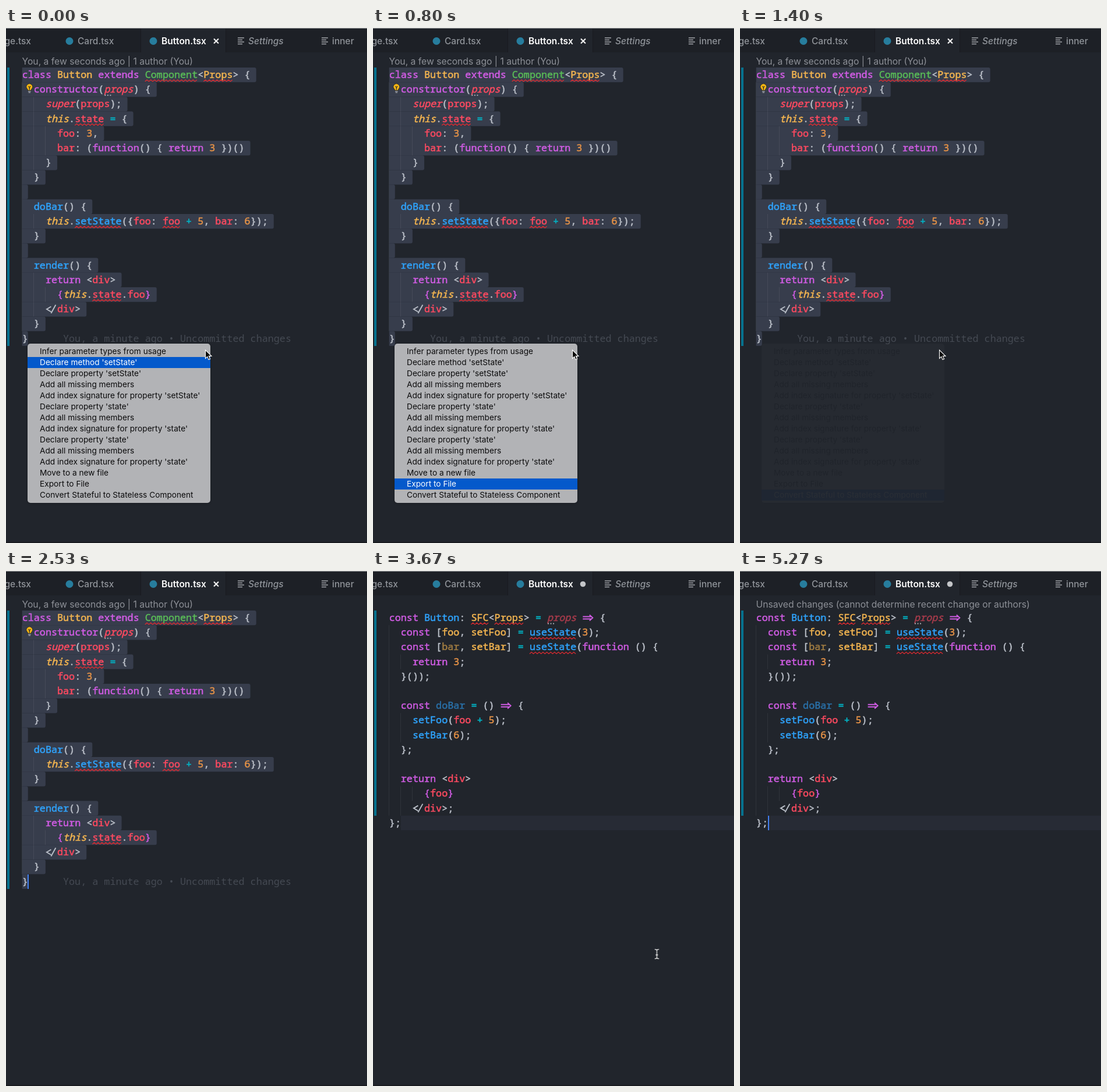
Recreate the animation shown at these times as an HTML page. Size 620 by 886 pixels, loop 5.34 s.

```html
<!DOCTYPE html>
<html lang="en">
<head>
<meta charset="utf-8">
<title>Editor refactoring</title>
<style>
  html, body { margin: 0; width: 620px; height: 886px; overflow: hidden; background: #21252c; }
  body { position: relative; }
  svg { position: absolute; left: 0; top: 0; display: block; }
  text { white-space: pre; }

  .ui { font: 500 15.5px Inter, Roboto, sans-serif; fill: #90949a; }
  .ui .open { font-weight: 600; fill: #fff; }
  .lens { font: 15.7px Inter, Roboto, sans-serif; fill: #8d9097; }
  .code { font: 500 16.75px "Noto Sans Mono", "DejaVu Sans Mono", monospace; stroke-width: .55; }
  .blame { fill: #454a53; font-weight: 400; }
  .guide { stroke: #fff; stroke-opacity: .07; stroke-width: 1; }
  .wave { fill: none; stroke: #dc2a30; stroke-width: 1.3; }
  .liga { fill: none; stroke-width: 1.9; }

  .menu {
    position: absolute; left: 37px; top: 543px; width: 314px; height: 267px; padding: 4px 0 3px;
    border-radius: 5px; background: #b2b3b6; box-shadow: 0 1px 4px rgba(0, 0, 0, .2);
    font: 13.7px/19px Inter, Roboto, sans-serif; color: #0b0b0c;
  }
  .list div { height: 19px; padding-left: 21px; white-space: pre; }
  .pick { position: absolute; left: 0; top: 23px; width: 314px; height: 19px; overflow: hidden; background: #0459cb; color: #fff; }
  .pick .list { margin-top: -19px; }

  .before, .after, .menu, .pick, .pick .list, .lens2, .caret1, .caret2, .arrow, .beam {
    animation: 5340ms step-end infinite;
  }
  .before { animation-name: before; }
  .after { animation-name: after; }
  .menu { animation-name: menu; animation-timing-function: linear; }
  .pick { animation-name: down; }
  .pick .list { animation-name: up; }
  .lens2 { animation-name: lens; }
  .caret1 { animation-name: blink1; }
  .caret2 { animation-name: blink2; }
  .arrow { animation-name: arrow; }
  .beam { animation-name: beam; }

  @keyframes before { 0% { opacity: 1 } 54.87%, 100% { opacity: 0 } }
  @keyframes after { 0% { opacity: 0 } 54.87%, 100% { opacity: 1 } }
  @keyframes menu { 0%, 23.03% { opacity: 1 } 26.38%, 100% { opacity: 0 } }
  @keyframes down {
    0% { transform: none }
    .94% { transform: translateY(0); animation-timing-function: steps(12, start) }
    17.79%, 100% { transform: translateY(228px) }
  }
  @keyframes up {
    0% { transform: none }
    .94% { transform: translateY(0); animation-timing-function: steps(12, start) }
    17.79%, 100% { transform: translateY(-228px) }
  }
  @keyframes lens { 0% { opacity: 0 } 73.78%, 100% { opacity: 1 } }
  @keyframes blink1 {
    0%, 14.98%, 36.52%, 54.8%, 100% { opacity: 0 }
    5.62%, 27.15%, 45.88% { opacity: 1 }
  }
  @keyframes blink2 {
    0%, 64.23%, 82.96% { opacity: 0 }
    54.87%, 73.6%, 92.32%, 100% { opacity: 1 }
  }
  @keyframes arrow { 0% { opacity: 1 } 39.89%, 100% { opacity: 0 } }
  @keyframes beam {
    0% { opacity: 0; transform: translate(470px, 678px) }
    58.61% { opacity: 1; transform: translate(470px, 678px); animation-timing-function: ease-out }
    66.29% { opacity: 1; transform: translate(487.5px, 659px) }
    74.91%, 100% { opacity: 0; transform: translate(487.5px, 659px) }
  }
</style>
</head>
<body>
<svg width="620" height="886" viewBox="0 0 620 886">
  <rect width="620" height="42" fill="#1d2026"/>
  <rect x="231" width="146" height="43" fill="#21252c"/>
  <path d="M231.5 1V42M377.5 1V42" stroke="#181a1f"/>
  <rect width="620" height="1" fill="#8d8f92"/>
  <rect y="884" width="620" height="2" fill="#191b20"/>

  <g class="ui">
    <text x="43" y="28" text-anchor="end">ge.tsx</text>
    <text x="123" y="28">Card.tsx</text>
    <text x="267" y="28" class="open">Button.tsx</text>
    <text x="416" y="28" font-style="italic">Settings</text>
    <text x="560" y="28">inner</text>
  </g>
  <g fill="#277d9d">
    <circle cx="109" cy="22.5" r="6.5"/>
    <circle cx="253" cy="22.5" r="6.5"/>
  </g>
  <path d="M398 17h11M398 20.5h8M398 24h11M398 27.5h8M542 17h11M542 20.5h8M542 24h11M542 27.5h8" stroke="#a2a5aa" stroke-width="1.5"/>

  <g class="before">
    <path d="M357 18.5l8 8M365 18.5l-8 8" stroke="#f2f2f2" stroke-width="2.1"/>
    <text class="lens" x="27.5" y="63">You, a few seconds ago | 1 author (You)</text>
    <rect x="2" y="68" width="4" height="479" fill="#06728f"/>
    <g class="code" id="old"></g>
    <text class="code blame" x="98" y="540">You, a minute ago • Uncommitted changes</text>
    <path d="M37.5 107.5q0-2-1.5-3.2a5.3 5.3 0 1 1 8.6 0q-1.5 1.2-1.5 3.2z" fill="#f1b414" stroke="#24262b"/>
    <path d="M38.5 100l1.8 2.5 1.8-2.5M40.3 102.5v4" fill="none" stroke="#24262b" stroke-width="1.2"/>
    <path d="M38 109h4.6M38.6 111h3.4" stroke="#c9c9c9" stroke-width="1.2"/>
    <rect class="caret1" x="37" y="522" width="2" height="25" fill="#4180f2"/>
  </g>

  <g class="after">
    <circle cx="360.5" cy="22.5" r="4.8" fill="#c3c5c8"/>
    <text class="lens lens2" x="27.5" y="63">Unsaved changes (cannot determine recent change or authors)</text>
    <rect x="48" y="421" width="572" height="25" fill="#272b35"/>
    <rect x="2" y="68" width="4" height="353" fill="#06728f"/>
    <g class="code" id="new"></g>
    <rect class="caret2" x="48" y="421" width="2" height="25" fill="#4180f2"/>
  </g>
</svg>

<div class="menu">
  <div class="list"></div>
  <div class="pick"><div class="list"></div></div>
</div>

<svg width="620" height="886" viewBox="0 0 620 886">
  <path class="arrow" d="M342.5 554v14.5l3.3-3.1 2.2 5.2 2.6-1.1-2.2-5.1h4.6z" fill="#0a0a0a" stroke="#fff" stroke-width="1.1"/>
  <path class="beam" d="M-3.5-8q3 0 3.5 1.5Q.5-8 3.5-8M0-6.5V6.5M-3.5 8q3 0 3.5-1.5Q.5 8 3.5 8M-2 1.5h4" fill="none" stroke="#e8e8e8" stroke-width="1.3"/>
</svg>

<script>
const LEFT = 27.7, TOP = 68, CELL = 10.05, LINE = 25.2;
const COLORS = {
  p: '#d05ce3', y: '#f2b450', r: '#fc4a60', b: '#2fa2fa',
  g: '#59ba57', c: '#00b5c6', o: '#e59247', f: '#babfc8'
};

// Markup: ~flags text~, first flag is the colour; i italic, s squiggle, d dimmed, h hint dots.
const OLD = `~p class~ ~y Button~ ~p extends~ ~gs Component~<~ys Props~> {
  ~p constructor~(~rih props~) {
    ~ri super~(~r props~);
    ~yi this~.~rs state~ ~c =~ {
      ~r foo~: ~o 3~,
      ~r bar~: (~p function~() { ~p return~ ~o 3~ })()
    }
  }

  ~b doBar~() {
    ~yi this~.~bs setState~({~r foo~: ~rs foo~ ~c +~ ~o 5~, ~r bar~: ~o 6~});
  }

  ~b render~() {
    ~p return~ <~r div~>
      ~p {~~yi this~.~rs state~.~r foo~~p }~
    ~f </~~r div~>
  }
}`;
const NEW = `~p const~ ~b Button~: ~ys SFC~<~ys Props~> ~c =~ ~ridh props~ ~p =>~ {
  ~p const~ [~y foo~, ~y setFoo~] ~c =~ ~bs useState~(~o 3~);
  ~p const~ [~yd bar~, ~y setBar~] ~c =~ ~bs useState~(~p function~ () {
    ~p return~ ~o 3~;
  }());

  ~p const~ ~bd doBar~ ~c =~ () ~p =>~ {
    ~b setFoo~(~r foo~ ~c +~ ~o 5~);
    ~b setBar~(~o 6~);
  };

  ~p return~ <~r div~>
      ~p {~~r foo~~p }~
    ~f </~~r div~>;
};`;

const esc = s => s.replace(/&/g, '&amp;').replace(/</g, '&lt;');

function wave(x, y, width) {
  let d = `M${x} ${y}`;
  for (let i = 1; i * 3.3 <= width; i++) d += `L${x + i * 3.3} ${y - (i % 2) * 2.8}`;
  return `<path class="wave" d="${d}"/>`;
}

function ligature(text, x, y, color) {
  const d = text === '=>'
    ? 'M1-2h14M1 2h14M12.5-5l5.5 5-5.5 5'
    : 'M9.5-4.5L2 0l7.5 4.5M9.5 7L17.5-7.5';
  return `<path class="liga" transform="translate(${x} ${y - 5.5})" d="${d}" stroke="${color}"/>`;
}

function token(text, flags, x, y) {
  const has = f => flags.indexOf(f, 1) > 0;
  const color = COLORS[flags[0]];
  const base = y + 18;
  const style = (has('i') ? ' font-style="italic"' : '') + (has('d') ? ' opacity=".6"' : '');
  let out = /^(=>|<\/)$/.test(text)
    ? ligature(text, x, base, color)
    : `<text x="${x}" y="${base}" fill="${color}" stroke="${color}"${style}>${esc(text)}</text>`;
  if (has('s')) out += wave(x, y + 24, text.length * CELL);
  if (has('h')) for (const dx of [1, 5.5, 10]) out += `<rect x="${x + dx}" y="${y + 21.5}" width="2" height="2" fill="#a7abb2"/>`;
  return out;
}

function paint(id, source, selected) {
  const lines = source.split('\n');
  let back = '', guides = '', front = '';
  lines.forEach((line, row) => {
    const y = TOP + row * LINE;
    const indent = line ? line.search(/\S/) : 2;
    for (let col = 0; col < indent; col += 2)
      guides += `<path class="guide" d="M${Math.floor(LEFT + col * CELL) + .5} ${y}v${LINE}"/>`;
    let col = 0;
    for (const [, flags = 'f', marked, plain] of line.matchAll(/~(\w+) ([^~]*)~|([^~]+)/g)) {
      const text = marked || plain;
      if (text.trim()) front += token(text, flags, LEFT + col * CELL, y);
      col += text.length;
    }
    if (selected) {
      const w = (col + (row < lines.length - 1)) * CELL - 3;
      back += `<path d="M${LEFT} ${y}h${w}q3 0 3 3v${LINE - 6}q0 3-3 3h${-w}z"/>`;
    }
  });
  document.getElementById(id).innerHTML = `<g fill="#373d4c">${back}</g>${guides}${front}`;
}

paint('old', OLD, true);
paint('new', NEW, false);

const add = 'Add all missing members';
const stateFixes = ["Declare property 'state'", add, "Add index signature for property 'state'"];
const items = [
  'Infer parameter types from usage', "Declare method 'setState'",
  "Declare property 'setState'", add, "Add index signature for property 'setState'",
  ...stateFixes, ...stateFixes,
  'Move to a new file', 'Export to File', 'Convert Stateful to Stateless Component'
];
for (const list of document.querySelectorAll('.list'))
  list.innerHTML = items.map(s => `<div>${s}</div>`).join('');
</script>
</body>
</html>
```
